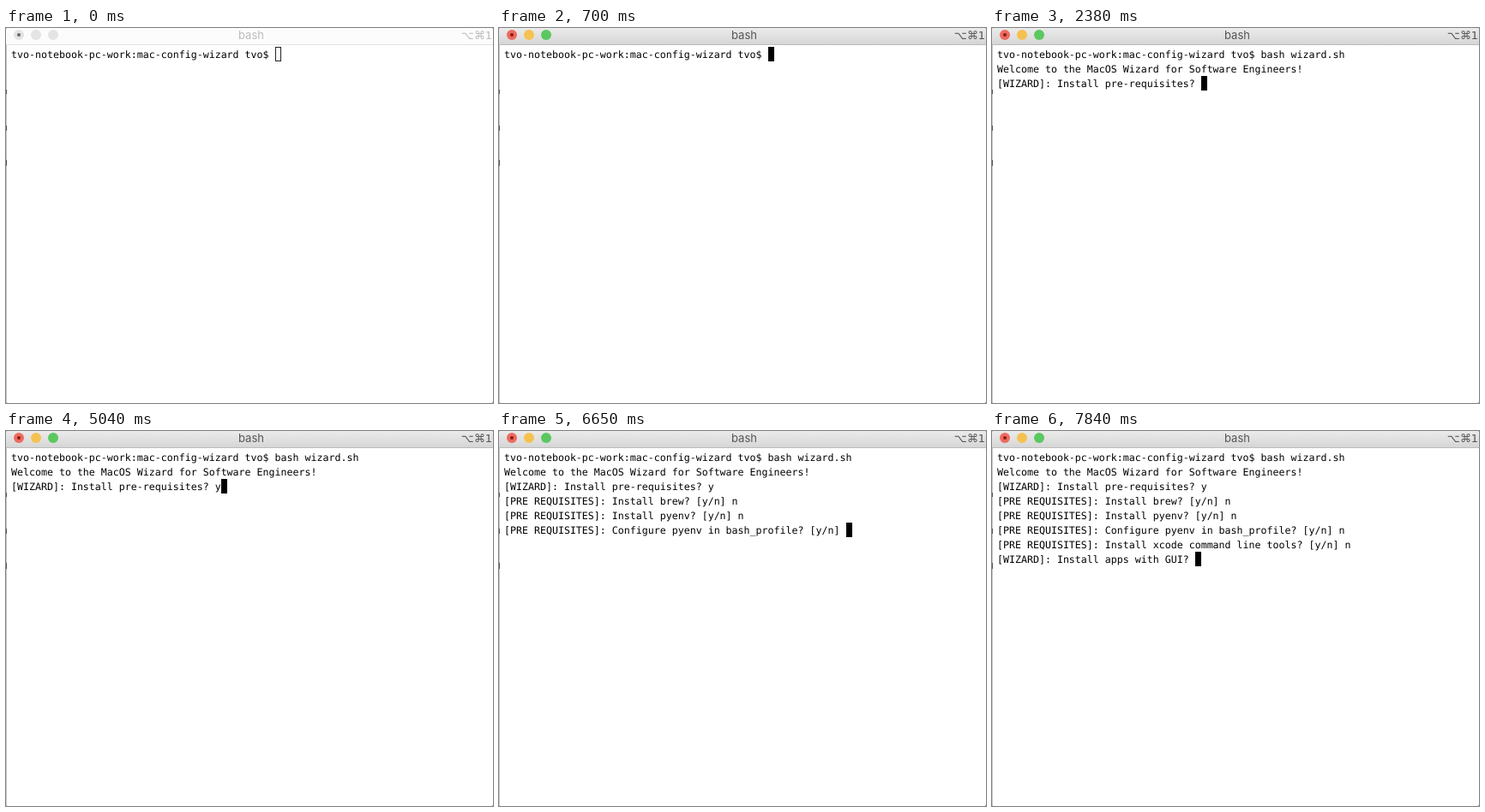
Write an HTML page that moves like this. It is 568 px wide and 438 px high and loops after 8000 ms.

```html
<!DOCTYPE html>
<html lang="en">
<head>
<meta charset="utf-8">
<title>Terminal</title>
<style>
  html, body { margin: 0; width: 100%; height: 100%; overflow: hidden; background: #777; }
  #win {
    position: absolute; left: 0; top: 0; width: 568px; height: 438px;
    overflow: hidden; border-radius: 2px; background: #fff;
    --bar-top: #fcfcfc; --bar-end: #fcfcfc; --rule: #e2e2e2; --label: #bcbcbc;
    --close: #e4e4e4; --min: #e4e4e4; --zoom: #e4e4e4; --dot: #666;
  }
  #win.focused {
    --bar-top: #ebebeb; --bar-end: #d6d6d6; --rule: #bcbcbc; --label: #555;
    --close: #ed6a5f; --min: #f5c251; --zoom: #5ac85f; --dot: #8c1a10;
  }
  #bar {
    position: absolute; left: 0; top: 0; width: 568px; height: 20px;
    box-sizing: border-box; border-bottom: 1px solid var(--rule);
    background: linear-gradient(var(--bar-top), var(--bar-end));
  }
  svg { position: absolute; left: 0; top: 0; }
  svg text { font: 13px Inter, "Liberation Sans", sans-serif; fill: var(--label); }
  svg .keys { font-family: "DejaVu Sans", sans-serif; }
  #screen {
    position: absolute; left: 6px; top: 23px; margin: 0; color: #000;
    font: 11.627px/17px "DejaVu Sans Mono", monospace;
    text-rendering: geometricPrecision; font-variant-ligatures: none;
  }
  #cursor {
    position: absolute; width: 7px; height: 17px;
    box-sizing: border-box; border: 1px solid #222;
  }
  .focused #cursor { background: #000; border-color: #000; }
</style>
</head>
<body>
<div id="win">
  <div id="bar"></div>
  <pre id="screen"></pre>
  <div id="cursor"></div>
  <svg width="568" height="438">
    <circle cx="15" cy="8" r="6" fill="var(--close)"/>
    <circle cx="15" cy="8" r="2" fill="var(--dot)"/>
    <circle cx="35" cy="8" r="6" fill="var(--min)"/>
    <circle cx="55" cy="8" r="6" fill="var(--zoom)"/>
    <text x="286" y="13" text-anchor="middle">bash</text>
    <text class="keys" x="567" y="13" text-anchor="end">⌥⌘1</text>
    <path d="M.5 20V438" stroke="#c6c6c6"/>
    <path d="M.5 72v5M.5 114v6M.5 154v7" stroke="#555"/>
  </svg>
</div>
<script>
  const LOOP = 8000, FOCUS = 700;
  const CELL = 7, ROW = 17, LEFT = 6, TOP = 22;
  const pre = '\n[PRE REQUISITES]: ';

  // Output and keystrokes, each with the time it appears
  const log = [
    [0, 'tvo-notebook-pc-work:mac-config-wizard tvo$ '],
    [1820, 'bash wizard.sh'],
    [2380, '\nWelcome to the MacOS Wizard for Software Engineers!' +
           '\n[WIZARD]: Install pre-requisites? '],
    [5040, 'y'],
    [5180, pre + 'Install brew? [y/n] '],
    [5740, 'n'],
    [6020, pre + 'Install pyenv? [y/n] '],
    [6300, 'n'],
    [6650, pre + 'Configure pyenv in bash_profile? [y/n] '],
    [6930, 'n'],
    [7140, pre + 'Install xcode command line tools? [y/n] '],
    [7630, 'n'],
    [7840, '\n[WIZARD]: Install apps with GUI? ']
  ];

  const win = document.getElementById('win');
  const screen = document.getElementById('screen');
  const cursor = document.getElementById('cursor');

  function draw() {
    const t = performance.now() % LOOP;
    const text = log.filter(([at]) => at <= t).map(([, part]) => part).join('');
    const rows = text.split('\n');

    win.classList.toggle('focused', t >= FOCUS);
    if (screen.textContent !== text) screen.textContent = text;
    cursor.style.left = LEFT + rows.at(-1).length * CELL + 'px';
    cursor.style.top = TOP + (rows.length - 1) * ROW + 'px';
    requestAnimationFrame(draw);
  }
  draw();
</script>
</body>
</html>
```
